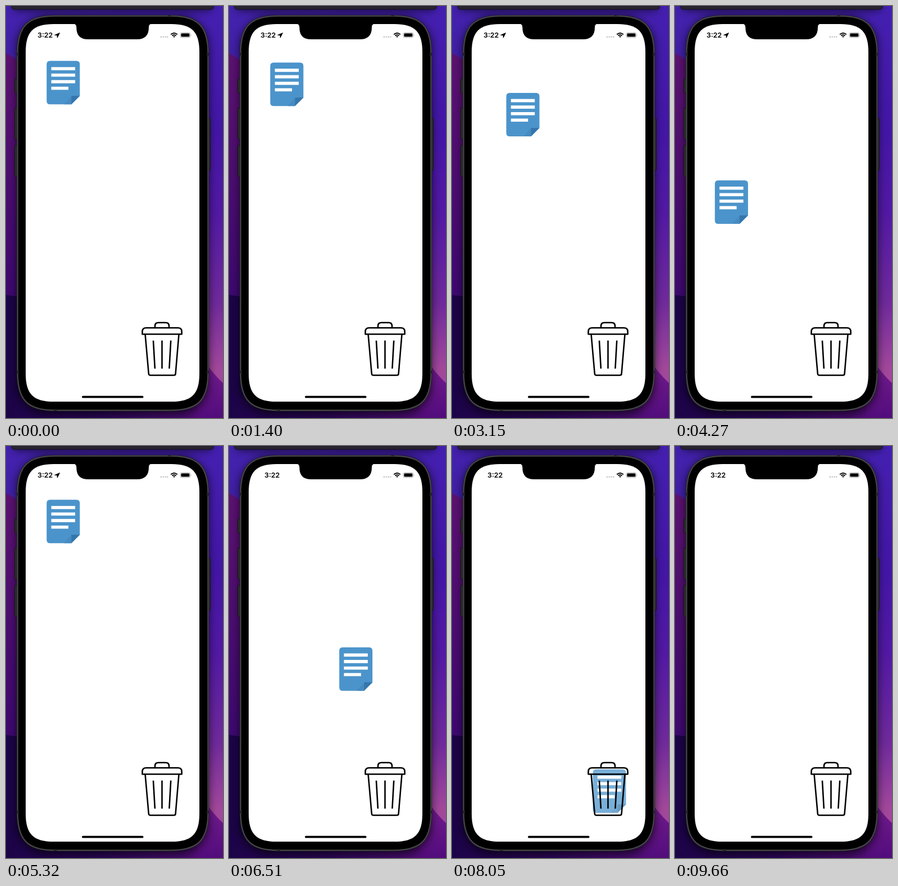
Write an HTML page that moves like this. It is 386 px wide and 730 px high and loops after 9730 ms.

```html
<!DOCTYPE html>
<html lang="en">
<head>
<meta charset="utf-8">
<title>Drag to bin</title>
<style>
  html, body { margin: 0; width: 100%; height: 100%; overflow: hidden; background: #2a0762; }
  svg { display: block; width: 386px; height: 730px; }
  .time { font: 600 12.4px Inter, "Open Sans", sans-serif; }
  .line { fill: none; stroke: #000; stroke-width: 2.6; stroke-linecap: round; stroke-linejoin: round; }
</style>
</head>
<body>
<svg viewBox="0 0 386 730">
  <defs>
    <linearGradient id="left" x2="0" y2="1">
      <stop offset="0" stop-color="#4422b0"/>
      <stop offset=".17" stop-color="#3f1fa0"/>
    </linearGradient>
    <linearGradient id="leftWave" x2="0" y2="1">
      <stop offset="0" stop-color="#5c1272"/>
      <stop offset="1" stop-color="#3c0870"/>
    </linearGradient>
    <linearGradient id="right" x2="0" y2="1">
      <stop offset="0" stop-color="#4420b0"/>
      <stop offset=".3" stop-color="#4316a6"/>
      <stop offset=".5" stop-color="#5219a4"/>
      <stop offset=".72" stop-color="#702a9c"/>
      <stop offset=".88" stop-color="#a2489c"/>
    </linearGradient>
    <linearGradient id="floor">
      <stop offset="0" stop-color="#1c0448"/>
      <stop offset=".45" stop-color="#2c0659"/>
      <stop offset="1" stop-color="#5c1080"/>
    </linearGradient>
    <linearGradient id="rightWave" x2="0" y2="1">
      <stop offset="0" stop-color="#7c2092"/>
      <stop offset="1" stop-color="#520c7c"/>
    </linearGradient>
    <filter id="blur" x="-20%" y="-10%" width="140%" height="120%"><feGaussianBlur stdDeviation="8"/></filter>
  </defs>

  <!-- Wallpaper -->
  <rect width="193" height="730" fill="url(#left)"/>
  <rect x="193" width="193" height="730" fill="url(#right)"/>
  <path d="M0 84Q14 90 30 104V540H0Z" fill="url(#leftWave)"/>
  <path d="M0 512L30 516V730H0Z" fill="#1c0448"/>
  <rect y="690" width="386" height="40" fill="url(#floor)"/>
  <path d="M340 610Q364 648 386 668V730H340Z" fill="url(#rightWave)"/>

  <!-- Shadows and window edge -->
  <g opacity=".62" filter="url(#blur)">
    <rect x="19" y="18" width="342" height="706" rx="54"/>
    <rect x="14" y="-30" width="351" height="38"/>
  </g>
  <path d="M10 0H369V2Q369 6 364 6H15Q10 6 10 2Z" fill="#29242f" stroke="#151021"/>

  <!-- Phone -->
  <g fill="#2a2a2c" stroke="#111" stroke-width=".8">
    <rect x="15.5" y="129" width="6" height="25" rx="1.5"/>
    <rect x="15.5" y="181" width="6" height="55" rx="1.5"/>
    <rect x="15.5" y="247" width="6" height="55" rx="1.5"/>
    <rect x="358" y="199" width="5.5" height="92" rx="1.5"/>
  </g>
  <path data-box="19 16 342 702 53" fill="#202022"/>
  <path data-box="20.7 17.7 338.6 698.6 51.3" stroke="#48484a" stroke-width="2"/>
  <path d="M19 85.5h4M357 85.5h4M19 648.5h4M357 648.5h4M88 714v4M291 16v4" stroke="#222224" stroke-width="5"/>
  <path data-box="35 32 309 669 38.5" fill="#fff"/>
  <path d="M120 31.5Q125.3 32 125.3 38C125.3 52 132 59 146 59H233C247 59 254 52 254 38Q254 32 259 31.5Z"/>

  <!-- Status bar -->
  <text id="clock" class="time" x="56" y="56">3:22</text>
  <path id="arrow" d="M95.3 47.3L86.3 51.3Q85.7 52 86.6 52.1L90.6 52.2 90.8 56.2Q91 57.1 91.7 56.3L95.9 47.8Q95.9 47.1 95.3 47.3Z"/>
  <path d="M275.9 54.7H288" stroke="#bdbdbd" stroke-width="2.4" stroke-linecap="round" stroke-dasharray=".01 3.8"/>
  <g fill="none" stroke="#000" stroke-width="1.9">
    <path d="M293.2 50.5Q299 45.4 304.800 50.5M295.4 52.8Q299 49.7 302.6 52.8"/>
    <path d="M297.1 53.9Q299 52.5 300.9 53.9L299 56Z" fill="#000" stroke="none"/>
  </g>
  <rect x="310" y="47.3" width="17.8" height="8.6" rx="2.5" fill="#fff" stroke="#aaa" stroke-width=".9"/>
  <rect x="311.4" y="48.6" width="15" height="6" rx="1.4"/>
  <path d="M328.800 50Q330.4 51.6 328.800 53.2Z" fill="#999"/>

  <!-- Document -->
  <g id="doc">
    <path d="M6 0H53Q59 0 59 6V62L44 77H6Q0 77 0 71V6Q0 0 6 0Z" fill="#4b94cb"/>
    <path d="M44 62V77H31Z" fill="#458bc1"/>
    <path d="M44 62H59L44 77Z" fill="#3576ac"/>
    <path d="M8.3 13.700H50.700M8.3 25.200H50.700M8.3 36.800H50.700M8.3 48.400H38.700" stroke="#fff" stroke-width="5.6"/>
  </g>

  <!-- Bin -->
  <g class="line">
    <path d="M265 570V567Q265 561 271 561H284Q290 561 290 567V570"/>
    <path d="M242.5 581.5V577Q242.5 570.3 249.5 570.3H305.6Q312.6 570.3 312.6 577V581.5Z"/>
    <path d="M247.6 582L253.800 651.5Q254.1 654.2 256.800 654.2H298.700Q301.3 654.2 301.6 651.5L307.5 582"/>
    <path d="M262 592.800L264.9 642.5M277.5 592.800V642.5M293.2 592.800L290.4 642.5" stroke-linecap="butt"/>
  </g>

  <rect x="135" y="690.8" width="109.5" height="3.7" rx="1.85"/>
</svg>
<script>
  const LOOP = 9730, STEP = 70;
  const GLIDE = 350, FADE_START = 7945, FADE_TIME = 315, ARROW_GONE = 6300;

  const home = t => ({ t, x: 72.3, y: 95.3 });
  const at = (t, x, y) => ({ t, x, y });
  const hold = (t, pose) => ({ ...pose, t });

  // A drag follows a curve through a few poses, swaying sideways by the given amount.
  const drag = (keys, sway = 0) => ({ keys, sway });
  const glideHome = (t, { keys }) => drag([hold(t, keys.at(-1)), home(t + GLIDE)]);

  const toMiddle = drag([at(1330, 72.3, 97.3), at(2240, 163, 333), at(2520, 184.5, 366.5)]);
  const straightDown = drag([home(3850), at(4270, 72.3, 309), at(4620, 71.5, 417.5)], 5);
  const intoBin = drag([home(5880), at(6860, 285, 552), at(7000, 280, 577),
    at(7140, 262, 587), at(7380, 252, 527), at(7700, 250.5, 573)]);
  const moves = [toMiddle, glideHome(2905, toMiddle), straightDown, glideHome(4935, straightDown), intoBin];

  const doc = document.getElementById('doc');
  const clock = document.getElementById('clock');
  const arrow = document.getElementById('arrow');
  const clamp = v => Math.min(1, Math.max(0, v));
  const smooth = p => p * p * (3 - 2 * p);

  // Rectangle whose corners blend gradually into the sides
  function softBox(x, y, w, h, r) {
    const a = 1.3 * r, c = .348 * r, R = x + w, B = y + h;
    return `M${x} ${y + a}C${x} ${y + c} ${x + c} ${y} ${x + a} ${y}H${R - a}` +
      `C${R - c} ${y} ${R} ${y + c} ${R} ${y + a}V${B - a}` +
      `C${R} ${B - c} ${R - c} ${B} ${R - a} ${B}H${x + a}` +
      `C${x + c} ${B} ${x} ${B - c} ${x} ${B - a}Z`;
  }
  for (const path of document.querySelectorAll('[data-box]'))
    path.setAttribute('d', softBox(...path.dataset.box.split(' ').map(Number)));

  function slope(keys, i, axis) {
    const before = keys[i - 1], after = keys[i + 1];
    return before && after ? (after[axis] - before[axis]) / (after.t - before.t) : 0;
  }

  // Cubic Hermite curve through the keys, at rest at both ends
  function along(keys, t, axis) {
    let i = 0;
    while (i < keys.length - 2 && t >= keys[i + 1].t) i++;
    const a = keys[i], b = keys[i + 1], span = b.t - a.t;
    const p = clamp((t - a.t) / span), q = 1 - p, s = smooth(p);
    return a[axis] * (1 - s) + b[axis] * s
      + span * p * q * (q * slope(keys, i, axis) - p * slope(keys, i + 1, axis));
  }

  function draw(now) {
    const t = Math.floor(now % LOOP / STEP) * STEP;
    const { keys, sway } = moves.findLast(move => move.keys[0].t <= t) || moves[0];
    const progress = clamp((t - keys[0].t) / (keys.at(-1).t - keys[0].t));
    const x = along(keys, t, 'x') + sway * Math.sin(2 * Math.PI * progress);
    doc.setAttribute('transform', `translate(${x} ${along(keys, t, 'y')})`);
    doc.setAttribute('opacity', 1 - smooth(clamp((t - FADE_START) / FADE_TIME)));
    const located = t < ARROW_GONE;
    clock.setAttribute('x', located ? 56 : 63);
    arrow.setAttribute('visibility', located ? 'visible' : 'hidden');
  }

  const start = performance.now();
  (function tick() {
    draw(performance.now() - start);
    requestAnimationFrame(tick);
  })();
</script>
</body>
</html>
```
